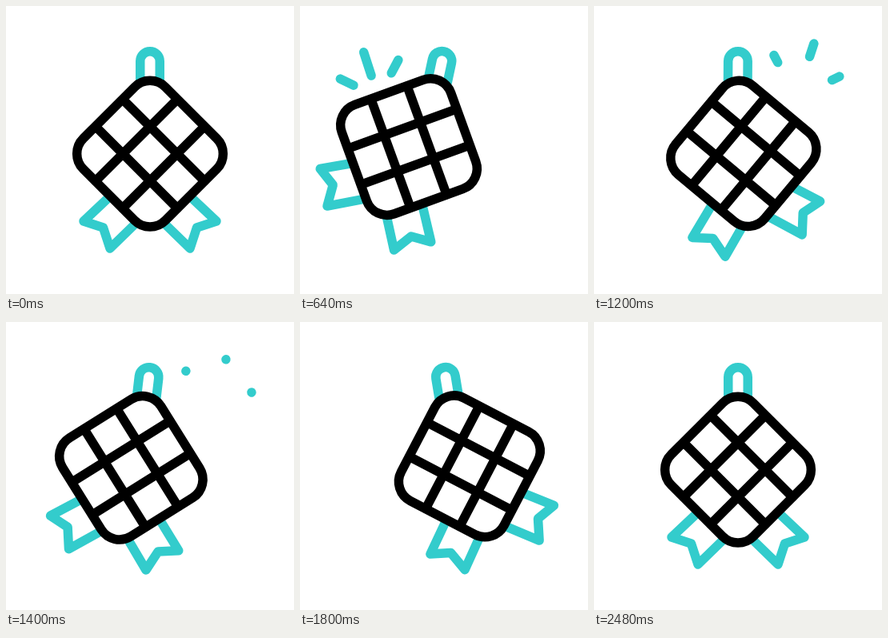
Write an HTML page that moves like this. It is 360x360 px and loops after 3 s.

```html
<!DOCTYPE html>
<html lang="en">
<head>
<meta charset="utf-8">
<title>Swinging ketupat</title>
<style>
  html, body { margin: 0; width: 100%; height: 100%; overflow: hidden; background: #fff; }
  svg { display: block; width: 100%; height: 100%; }
  .teal, .black { fill: none; stroke-width: 11.5; stroke-linecap: round; stroke-linejoin: round; }
  .teal { stroke: #33cccc; }
  .black { stroke: #000; }
</style>
</head>
<body>
<svg viewBox="0 0 360 360">
  <defs>
    <path id="ribbon" d="M132 236 L97 269 L121.5 277 L130 303 L167 267"/>
  </defs>
  <g class="teal" id="leftRays"></g>
  <g class="teal" id="rightRays" transform="translate(351 0) scale(-1 1)"></g>
  <g id="hook">
    <path class="teal" d="M167.75 94 V69 a12.25 12.25 0 0 1 24.5 0 V94"/>
    <g id="body">
      <g class="teal" id="ribbons">
        <use href="#ribbon"/>
        <use href="#ribbon" transform="translate(360 0) scale(-1 1)"/>
      </g>
      <g class="black" transform="translate(180 184.7) rotate(45)">
        <rect x="-72.5" y="-72.5" width="145" height="145" rx="27" fill="#fff"/>
        <path d="M-24 -72 V72 M24 -72 V72 M-72 -24 H72 M-72 24 H72"/>
      </g>
    </g>
  </g>
</svg>
<script>
const LOOP = 3000, STEP = 40;
const SWING_START = 170, BEAT = 395, SETTLE = 1.2 * BEAT;
const get = id => document.getElementById(id);

// All parts share one swing; each follows the part above it later and wider.
const swing = [0, 1, -0.92, 0.5, -0.67, 0];
const parts = [
  { el: get('hook'), pivotY: 57, reach: 14.5, lag: 0 },
  { el: get('body'), pivotY: 104, reach: 26, lag: 40 },
  { el: get('ribbons'), pivotY: 223, reach: 33.5, lag: 90 }
];
const bursts = [{ group: get('leftRays'), delay: 0 }, { group: get('rightRays'), delay: 440 }];

const mix = (a, b, u) => a + (b - a) * u;

function ease(t, start, duration) {
  const u = Math.min(1, Math.max(0, (t - start) / duration));
  return (1 - Math.cos(Math.PI * u)) / 2;
}

function swingAt(t) {
  const last = swing.length - 2;
  const beat = Math.min(last, Math.max(0, Math.floor(t / BEAT)));
  const duration = beat === last ? SETTLE : BEAT;
  return mix(swing[beat], swing[beat + 1], ease(t, beat * BEAT, duration));
}

// Rays fan out from one centre; side = -1, 0 or 1, the middle one is longest.
function drawBurst({ group, delay }, time) {
  const t = time - delay;
  const head = ease(t, 360, 420), tail = ease(t, 580, 310);
  group.style.display = t > 360 && t < 990 ? '' : 'none';
  group.innerHTML = [-1, 0, 1].map(side => {
    const inner = 24.5 + 7.5 * Math.abs(side), outer = 71 - 11 * Math.abs(side);
    return `<path transform="translate(98 114.3) rotate(${252 + 46 * side})"
      d="M${mix(inner, outer, tail)} 0 H${mix(inner, outer, head)}"/>`;
  }).join('');
}

function draw(t) {
  // Parts are nested, so each one turns only by its difference from its parent.
  let parentAngle = 0;
  for (const { el, pivotY, reach, lag } of parts) {
    const angle = reach * swingAt(t - SWING_START - lag);
    el.setAttribute('transform', `rotate(${angle - parentAngle} 180 ${pivotY})`);
    parentAngle = angle;
  }
  for (const burst of bursts) drawBurst(burst, t);
}

const begin = performance.now();
function tick() {
  const t = (performance.now() - begin) % LOOP;
  draw(Math.floor(t / STEP) * STEP);
  requestAnimationFrame(tick);
}
tick();
</script>
</body>
</html>
```
